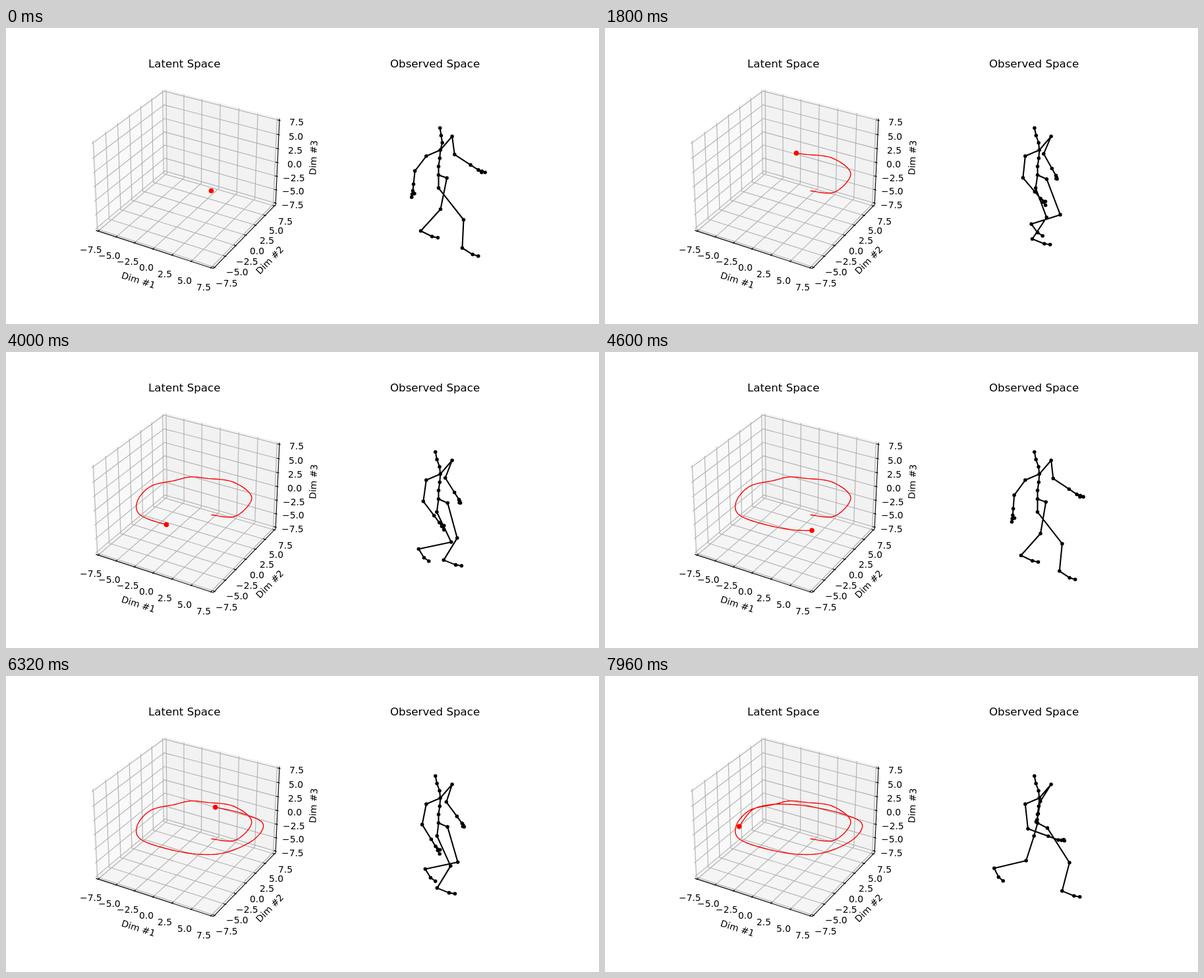
Write an HTML page that moves like this. It is 900 px wide and 450 px high and loops after 8000 ms.

```html
<!DOCTYPE html>
<html lang="en">
<head>
<meta charset="utf-8">
<title>Latent Space</title>
<style>
html, body { margin: 0; width: 100%; height: 100%; overflow: hidden; background: #fff; }
svg { display: block; width: 900px; height: 450px; font: 13.89px "DejaVu Sans", sans-serif; }
path { fill: none; stroke: #000; stroke-width: 1.11; }
.title { font-size: 16.67px; }
.turned { text-anchor: middle; }
.grid { stroke: #b0b0b0; }
.trail { stroke: red; stroke-width: 1.39; stroke-linejoin: round; }
.bones { stroke-width: 2.08; stroke-linejoin: round; }
.joints { stroke-width: 5.56; stroke-linecap: round; }
</style>
</head>
<body>
<svg viewBox="0 0 900 450" id="stage"></svg>
<script>
const stage = document.getElementById('stage');
const LOOP = 8000, STEP = 40, CYCLE = 4640;

function add(tag, attrs, text) {
  const el = document.createElementNS('http://www.w3.org/2000/svg', tag);
  for (const k in attrs) el.setAttribute(k, attrs[k]);
  if (text) el.textContent = text;
  return stage.appendChild(el);
}
const toPath = pts => 'M' + pts.map(p => p[0].toFixed(2) + ' ' + p[1].toFixed(2)).join('L');

// Centred text, snapped to whole pixels
function label(cls, x, y, text) {
  const el = add('text', { class: cls, y: Math.round(y) }, text);
  el.setAttribute('x', Math.round(x - el.getComputedTextLength() / 2));
}

// Perspective view, azimuth -60, elevation 30; each axis runs from -7.5 to 7.5
function project([x, y, z]) {
  const k = 1.142857 / 15, c = Math.sqrt(3) / 2;
  x *= k; y *= k; z *= k * 0.75;
  const u = c * x + y / 2;
  const v = -x / 4 + c / 2 * y + c * z;
  const depth = 10 - (c / 2 * x - 0.75 * y + z / 2);
  return [275.3 + 1713.8 * u / depth, 223 - 1713.8 * v / depth];
}
const line = (cls, ...pts) => add('path', { class: cls, d: toPath(pts.map(project)) });
const E = 7.5 * 25 / 24;

function pane(fill, ...pts) {
  add('path', { d: toPath(pts.map(project)) + 'Z', style: `fill:${fill};stroke:${fill}` });
}
pane('#f9f9f9', [-E, -E, -E], [-E, E, -E], [-E, E, E], [-E, -E, E]);
pane('#f2f2f2', [-E, E, -E], [E, E, -E], [E, E, E], [-E, E, E]);
pane('#f5f5f5', [-E, -E, -E], [E, -E, -E], [E, E, -E], [-E, E, -E]);

// at(v, o): point on an axis edge at value v, moved outward by o
const axes = [
  { at: (v, o) => [v, -E - o, -E - o], tick: (v, o) => [v, -E - o, -E],
    grid: v => [[v, -E, -E], [v, E, -E], [v, E, E]] },
  { at: (v, o) => [E + o, v, -E - o], tick: (v, o) => [E + o, v, -E],
    grid: v => [[E, v, -E], [-E, v, -E], [-E, v, E]] },
  { at: (v, o) => [E + o, E + o, v], tick: (v, o) => [E + o, E, v],
    grid: v => [[-E, -E, v], [-E, E, v], [E, E, v]] }
];
const ticks = Array.from({ length: 7 }, (_, i) => 2.5 * i - 7.5);

for (const a of axes) for (const v of ticks) line('grid', ...a.grid(v));
axes.forEach((a, i) => {
  line('', a.at(-E, 0), a.at(E, 0));
  for (const v of ticks) {
    line('', a.tick(v, 0.125), a.tick(v, -0.25));
    const [x, y] = project(a.at(v, 1.513));
    label('', x, y + 11, v.toFixed(1).replace('-', '\u2212'));
  }
  const [x, y] = project(a.at(0, 3.289));
  const p = project(a.at(-E, 0)), q = project(a.at(E, 0));
  const angle = Math.atan2(q[1] - p[1], q[0] - p[0]) * 180 / Math.PI;
  add('text', { class: 'turned', transform: `translate(${x} ${y}) rotate(${angle})`, y: 3.2 }, 'Dim #' + (i + 1));
});
label('title', 270.8, 60.4, 'Latent Space');
label('title', 651.2, 60.4, 'Observed Space');

// Catmull-Rom curve through evenly timed points; u counts in points
function curve(pts, u, closed) {
  const n = pts.length, i = Math.floor(u), s = u - i;
  const at = k => pts[closed ? (k + n) % n : Math.min(Math.max(k, 0), n - 1)];
  const [a, b, c, d] = [at(i - 1), at(i), at(i + 1), at(i + 2)];
  return b.map((v, k) => v + s / 2 * (c[k] - a[k]
    + s * (2 * a[k] - 5 * v + 4 * c[k] - d[k] + s * (3 * (v - c[k]) + d[k] - a[k]))));
}

// Two rounds of the latent path, one point every 400 ms
const latent = [
  [311, 247], [348, 249], [372.5, 221], [345, 197.5], [303, 191.5], [279, 189.5], [255, 195],
  [219.5, 203.5], [199, 226], [203, 247], [243, 262], [292, 270.5], [334, 267.5], [376, 248],
  [389.5, 224], [358, 208.5], [308, 197.5], [274, 194.5], [248, 195.5], [222.5, 203.5], [202, 230]
];

// One stride of the near leg; the far leg follows half a cycle later
const knee = [[694, 291], [696, 290], [692, 289], [672, 288], [649, 281], [630, 274], [645, 283], [678, 289]];
const ankle = [[692, 334], [702, 337], [675, 330], [651, 321], [619, 314], [599, 299], [592, 291], [631, 301]];

const wave = (phase, peak) => Math.cos(2 * Math.PI * (phase - peak));
const shift = ([x, y], dx, dy) => [x + dx, y + dy];
function polar([x, y], length, degrees) {
  const a = degrees * Math.PI / 180;
  return [x + length * Math.cos(a), y + length * Math.sin(a)];
}

function leg(hip, phase, dx, dy) {
  const u = phase % 1 * 8;
  const k = shift(curve(knee, u, true), dx, dy);
  const heel = shift(curve(ankle, u, true), dx, dy);
  const pitch = 37 + 22 * wave(phase, 0.77) + 8 * wave(2 * phase, 1.54);
  const ball = polar(heel, 22 - 0.11 * pitch, pitch);
  return [hip, k, heel, ball, polar(ball, 9, 0.75 * pitch - 8)];
}

// Elbow, wrist and fingertip each swing on an arc through three points
const leftArm = [
  [[618, 215], [632, 226], [642, 232]],
  [[613, 234], [647, 248], [674, 242]],
  [[607, 252], [661, 270], [699, 247]]
];
const rightArm = [
  [[683, 192], [667, 191], [660, 190]],
  [[708, 206], [682, 213], [655, 208]],
  [[732, 216], [692, 229], [651, 220]]
];

function arm(neck, shoulder, arcs, swing, thumb) {
  const [elbow, wrist, tip] = arcs.map(([a, m, b]) =>
    m.map((v, i) => v + swing * (b[i] - a[i]) / 2 + swing * swing * ((a[i] + b[i]) / 2 - v)));
  const hand = wrist.map((w, i) => w + 0.49 * (w - elbow[i]));
  const finger = hand.map((h, i) => h + 0.53 * (tip[i] - h));
  return [[neck, shoulder, elbow, wrist, hand, finger, tip], [hand, shift(finger, ...thumb)]];
}

function skeleton(t) {
  const phase = t / CYCLE, sway = wave(phase, 0.12);
  const swing = Math.sin(-1.4 * sway) / Math.sin(1.4);
  const lean = 7 * Math.exp(-t / 500);
  const neck = [658.7, 185], root = [656, 223];
  const spine = [[651.2 + lean, 151.5], [653.6 + lean * 0.9, 163], [657.5 + lean * 0.6, 174],
    neck, [657.8, 197.5], [656, 210], root];
  return [
    spine,
    ...arm(neck, [637.3, 194.3], leftArm, swing, [3.4, -1]),
    ...arm(neck, [676.6, 164.2], rightArm, swing, [-0.5, 1.8]),
    [root, ...leg([653.5 + 3.5 * sway, 242.8], phase, 0, 0)],
    [root, ...leg([669.7 - 1.5 * sway, 229 - 2 * sway], phase + 0.5, 10, -6)]
  ];
}

const onPixel = { transform: 'translate(.5 .5)' };
const trail = add('path', { class: 'trail', ...onPixel });
const dot = add('circle', { r: 3.8, fill: 'red', ...onPixel });
const bones = add('path', { class: 'bones', ...onPixel });
const joints = add('path', { class: 'joints', ...onPixel });
const track = Array.from({ length: LOOP / STEP }, (_, i) => curve(latent, i * STEP / 400));

function draw(n) {
  const [x, y] = track[n];
  trail.setAttribute('d', toPath(track.slice(0, n + 1)));
  dot.setAttribute('cx', x);
  dot.setAttribute('cy', y);
  const chains = skeleton(n * STEP);
  bones.setAttribute('d', chains.map(toPath).join(''));
  joints.setAttribute('d', chains.flat().map(([a, b]) => `M${a} ${b}h.01`).join(''));
}

const start = performance.now();
function tick() {
  draw(Math.floor((performance.now() - start) % LOOP / STEP));
  requestAnimationFrame(tick);
}
tick();
</script>
</body>
</html>
```
